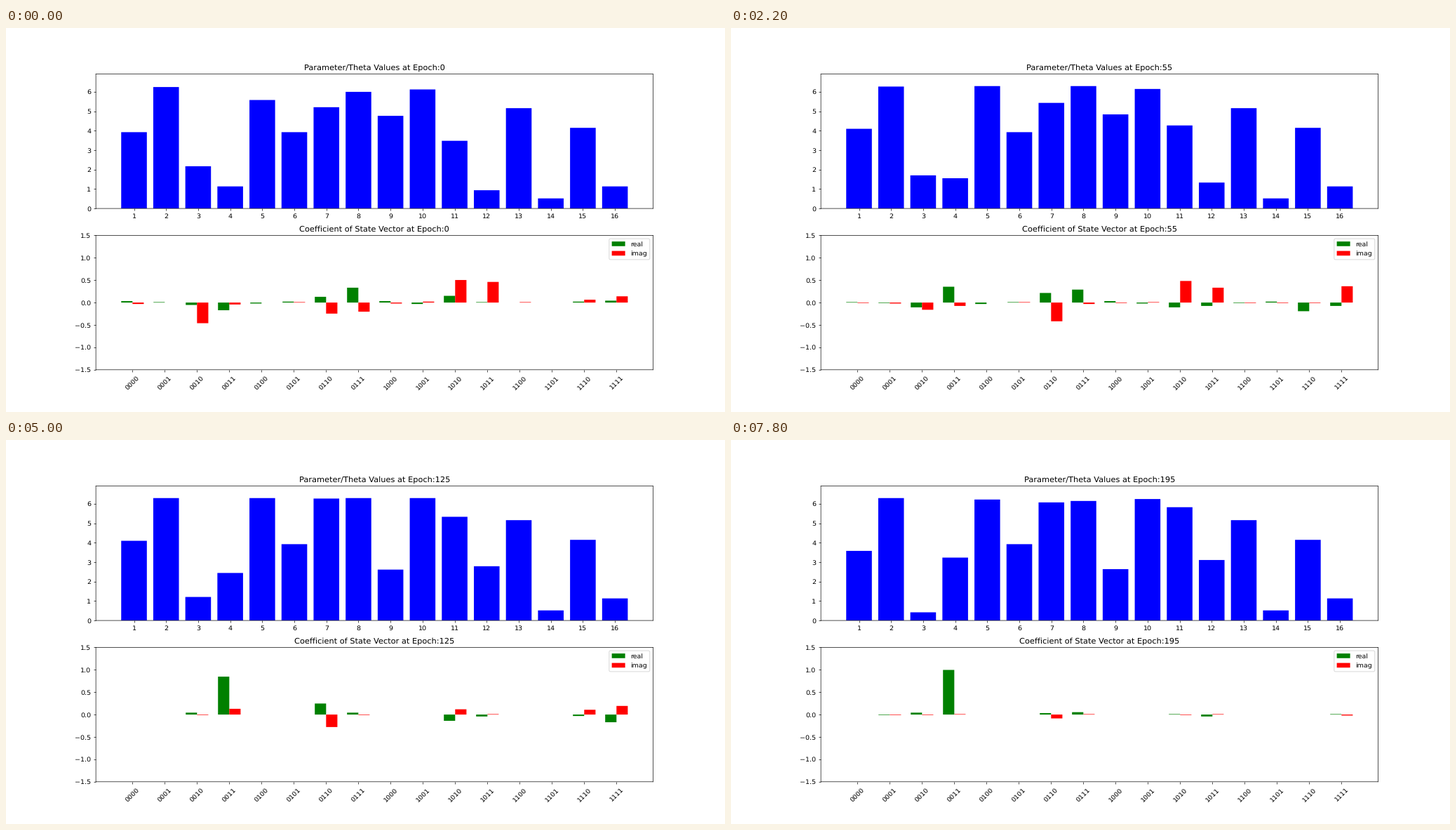
A matplotlib script that plays this animation: 1025 px wide and 547 px high, repeating every 8000 ms.

```python
import matplotlib.pyplot as plt
import numpy as np
from matplotlib.animation import FuncAnimation

WIDTH, HEIGHT = 1025, 547
DPI = WIDTH / 15
FRAMES, INTERVAL = 40, 200
EPOCHS = np.arange(FRAMES) * 5
TAU = 2 * np.pi

QUBITS = 4
INDEX = np.arange(2 ** QUBITS)
BITS = INDEX[:, None] >> np.arange(QUBITS) & 1
ONES = BITS.sum(axis=1)
CZ_ALL_PAIRS = (-1.0) ** (ONES * (ONES - 1) // 2)
START_STATE = 0b0011

START = [3.92, 6.25, 2.18, 1.14, 5.59, 3.92, 5.22, 6.00,
         4.77, 6.13, 3.49, 0.95, 5.15, 0.51, 4.15, 1.14]

# Turning points (epoch, angle) of the parameters that training moves.
MOVES = {
    1: [(35, 3.92), (75, 4.35), (100, 4.52), (140, 3.83), (195, 3.58)],
    2: [(75, TAU)],
    3: [(75, 1.58), (100, 1.51), (140, 0.95), (165, 0.50), (195, 0.43)],
    4: [(75, 1.69), (100, 1.80), (140, 2.84), (165, 3.15), (195, 3.24)],
    5: [(35, 6.05), (55, TAU), (140, TAU), (195, 6.22)],
    7: [(35, 5.27), (75, 5.71), (100, 6.23), (140, TAU), (165, 6.15), (195, 6.08)],
    8: [(25, TAU), (140, TAU), (165, 6.15)],
    9: [(35, 4.92), (75, 4.67), (100, 4.07), (140, 2.12), (165, 2.60), (195, 2.65)],
    10: [(35, 6.13), (75, 6.18), (105, TAU), (140, TAU), (165, 6.25)],
    11: [(35, 3.88), (75, 4.67), (100, 4.94), (140, 5.51), (195, 5.83)],
    12: [(35, 1.11), (75, 1.62), (100, 1.91), (140, 3.12)],
}


def glide(start, moves):
    """Monotone cubic curve from start through the moves, at every epoch shown."""
    points = [(0, start)] + moves
    if points[-1][0] < EPOCHS[-1]:
        points.append((EPOCHS[-1], points[-1][1]))
    x, y = np.array(points, float).T
    h = np.diff(x)
    secant = np.diff(y) / h
    left, right = secant[:-1], secant[1:]
    same_way = left * right > 0
    total = np.where(same_way, left + right, 1)
    inner = np.where(same_way, 2 * left * right / total, 0)
    slope = np.concatenate([secant[:1], inner, secant[-1:]])

    k = np.clip(np.searchsorted(x, EPOCHS, "right") - 1, 0, len(h) - 1)
    t = (EPOCHS - x[k]) / h[k]
    return ((1 + 2 * t) * (1 - t) ** 2 * y[k]
            + t * (1 - t) ** 2 * h[k] * slope[k]
            + t ** 2 * (3 - 2 * t) * y[k + 1]
            - t ** 2 * (1 - t) * h[k] * slope[k + 1])


def rotate_x(psi, qubit, angle):
    flipped = psi[INDEX ^ (1 << qubit)]
    return np.cos(angle / 2) * psi - 1j * np.sin(angle / 2) * flipped


def run_circuit(theta):
    """Two layers of X rotations, phase rotations and CZ between all pairs."""
    psi = (INDEX == START_STATE).astype(complex)
    for x_angles, z_angles in theta.reshape(2, 2, QUBITS):
        for qubit, angle in enumerate(x_angles):
            psi = rotate_x(psi, qubit, angle)
        psi = psi * np.exp(1j * (BITS @ z_angles)) * CZ_ALL_PAIRS
    return psi


def to_grid(values, unit):
    return np.round(values * unit) / unit


def set_heights(bars, heights):
    for bar, height in zip(bars, heights):
        bar.set_height(height)


theta = np.array([glide(start, MOVES.get(n, []))
                  for n, start in enumerate(START, 1)]).T
psi = np.array([run_circuit(row) for row in theta])

# Bar heights move in steps of 1/280 of the axes height.
TOP_LIMIT = 1.1 * TAU
theta = to_grid(theta, 280 / TOP_LIMIT)
real = to_grid(psi.real, 280 / 3)
imag = to_grid(psi.imag, 280 / 3)

plt.rcParams.update({
    "font.family": "DejaVu Sans",
    "text.hinting": "none",
    "path.snap": False,
    "axes.linewidth": 0.72,
    "xtick.major.width": 0.72,
    "ytick.major.width": 0.72,
})
fig, (top, bottom) = plt.subplots(
    2, 1, figsize=((WIDTH + 1e-6) / DPI, (HEIGHT + 1e-6) / DPI), dpi=DPI)

theta_bars = top.bar(INDEX + 1, theta[0], color="blue")
top.set_xticks(INDEX + 1)
top.set_xlim(-0.19, 17.19)
top.set_ylim(0, TOP_LIMIT)
top.set_yticks(range(7))

BAR = 0.35
real_bars = bottom.bar(INDEX - BAR / 2, real[0], BAR, color="green", label="real")
imag_bars = bottom.bar(INDEX + BAR / 2, imag[0], BAR, color="red", label="imag")
bottom.set_xticks(INDEX, [f"{i:04b}" for i in INDEX], rotation=45)
bottom.set_xlim(-1.135, 16.135)
bottom.set_ylim(-1.5, 1.5)
bottom.legend(loc="upper right")


def update(frame):
    set_heights(theta_bars, theta[frame])
    set_heights(real_bars, real[frame])
    set_heights(imag_bars, imag[frame])
    top.set_title(f"Parameter/Theta Values at Epoch:{EPOCHS[frame]}")
    bottom.set_title(f"Coefficient of State Vector at Epoch:{EPOCHS[frame]}")


anim = FuncAnimation(fig, update, frames=FRAMES, interval=INTERVAL,
                     repeat=True, repeat_delay=0)
plt.show()
```
